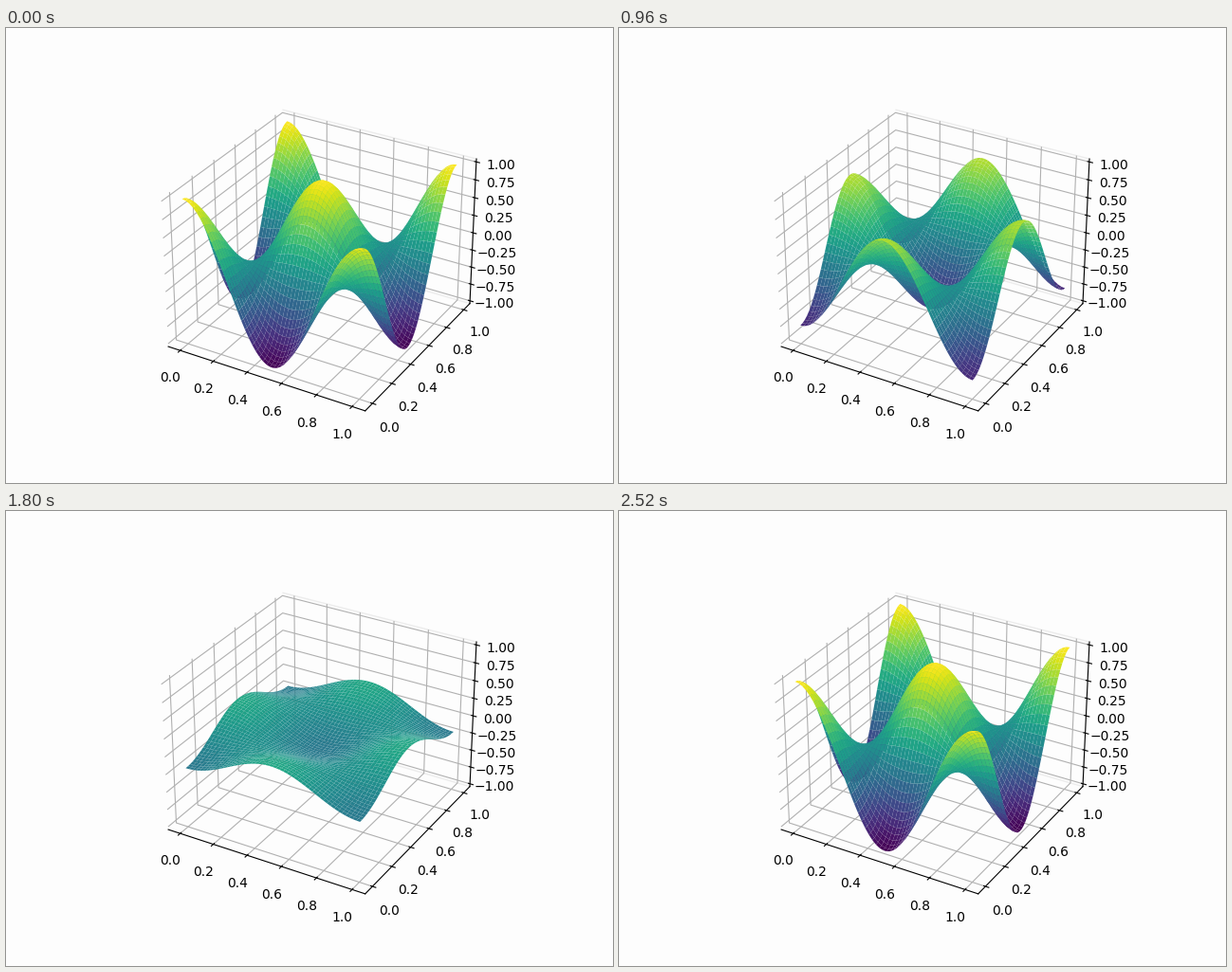
A matplotlib script that plays this animation: 640 by 480 pixels, repeating every 2560 ms.

```python
import numpy as np
import matplotlib.pyplot as plt
from matplotlib.animation import FuncAnimation

FRAMES = 64
INTERVAL = 40
BACKGROUND = "#fdfdfd"

axis = np.linspace(0, 1, 50)
X, Y = np.meshgrid(axis, axis)
SHAPE = np.cos(2 * np.pi * X) * np.cos(2 * np.pi * Y)


def height(i):
    return np.cos(2 * np.pi * (i + 1) / FRAMES) * SHAPE


def quads(z):
    """Four corners of every grid cell, as an (n, 4, 3) array."""
    p = np.stack([X, Y, z], axis=-1)
    cells = np.stack([p[:-1, :-1], p[:-1, 1:], p[1:, 1:], p[1:, :-1]], axis=2)
    return cells.reshape(-1, 4, 3)


def padded(low, high):
    pad = (high - low) / 48
    return low - pad, high + pad


fig = plt.figure(figsize=(6.4, 4.8), dpi=100, facecolor=BACKGROUND)
ax = fig.add_subplot(111, projection="3d")
ax.set_facecolor(BACKGROUND)

surface = ax.plot_surface(X, Y, height(0), cmap="viridis", vmin=-1, vmax=1,
                          rstride=1, cstride=1)

ax.set_xlim(*padded(-0.05, 1.05))
ax.set_ylim(*padded(-0.05, 1.05))
ax.set_zlim(*padded(-1, 1))

# Clear panes; only the back one keeps a faint outline.
for side, edge in ((ax.xaxis, "none"), (ax.yaxis, "#ececec"), (ax.zaxis, "none")):
    side.pane.set_alpha(None)
    side.pane.set_facecolor("none")
    side.pane.set_edgecolor(edge)


def update(i):
    cells = quads(height(i))
    surface.set_verts(cells)
    surface.set_array(cells[:, :, 2].mean(axis=1))
    return [surface]


anim = FuncAnimation(fig, update, frames=FRAMES, interval=INTERVAL,
                     repeat=True, repeat_delay=0, blit=False)
plt.show()
```
